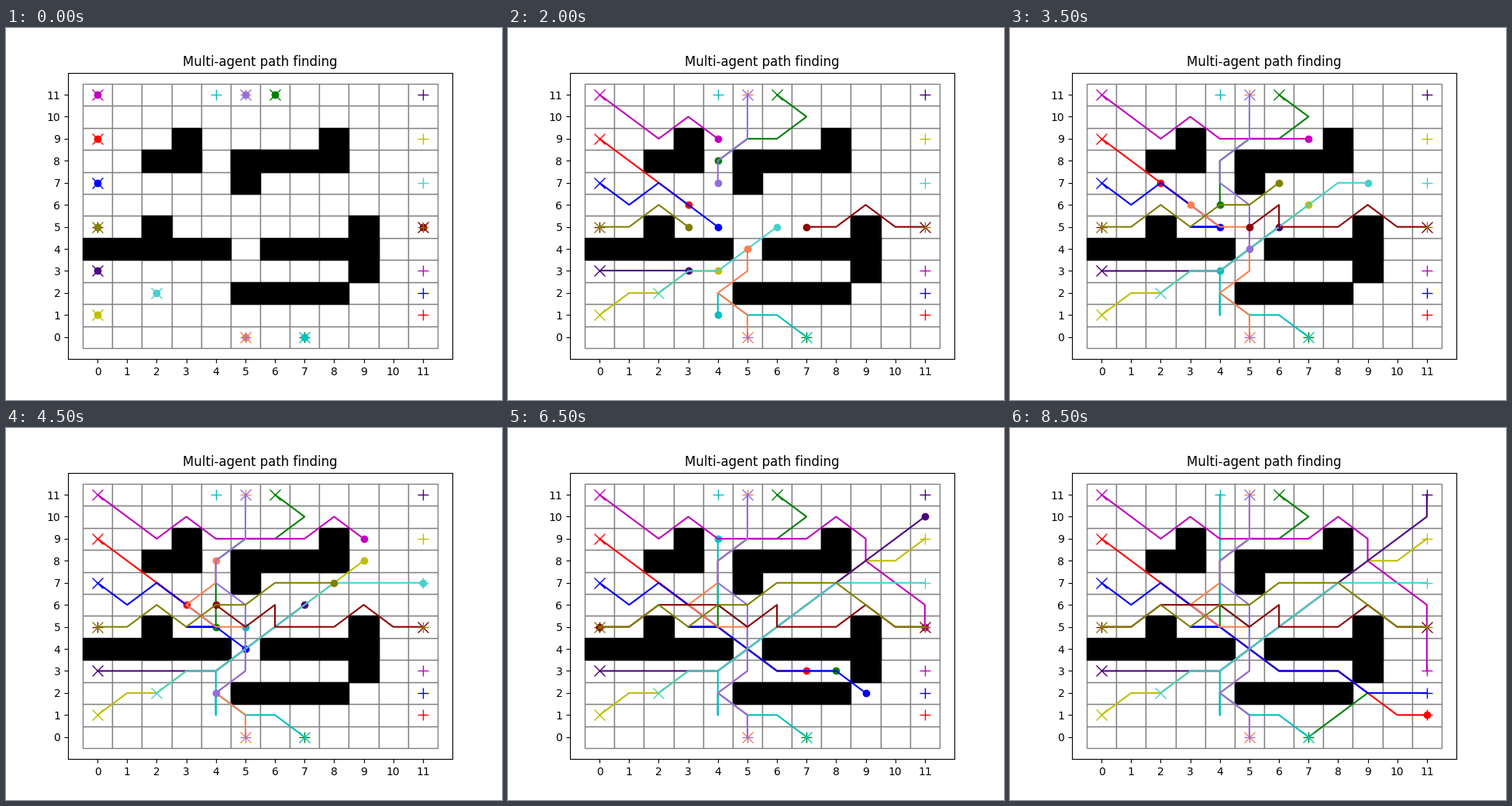
A matplotlib script for the animation above (10 s loop, 640 by 480 pixels).

```python
import matplotlib.pyplot as plt
import numpy as np
from matplotlib.animation import FuncAnimation
from matplotlib.patches import Rectangle

plt.rcParams["text.kerning_factor"] = 6

SIZE = 12
STEP_MS = 500
FRAMES = 20
WAIT = None

# Key cells per agent; between them it moves like a chess king.
EAST_LANE = [(8, 3), (9, 2)]
ROUTES = {
    "g": [(6, 11), (7, 10), (6, 9), (5, 9), (4, 6), WAIT, WAIT, (4, 5),
          *EAST_LANE, (7, 0)],
    "r": [(0, 9), (1, 8), WAIT, (3, 6), WAIT, WAIT, (2, 7), (3, 6), WAIT,
          *EAST_LANE, (11, 1)],
    "b": [(0, 7), (1, 6), (2, 7), (4, 5), WAIT, (3, 5), (4, 5), WAIT,
          *EAST_LANE, (11, 2)],
    "c": [(7, 0), (5, 1), (4, 2), (4, 1), (4, 3), WAIT, (5, 5), (4, 11)],
    "m": [(0, 11), (2, 9), (3, 10), (7, 9), (8, 10), (9, 9), (9, 8), (11, 3)],
    "y": [(0, 1), (2, 2), (4, 3), (10, 8), (11, 9)],
    "indigo": [(0, 3), (1, 3), WAIT, (4, 3), (7, 6), WAIT, (11, 11)],
    "mediumturquoise": [(2, 2), (4, 3), (11, 7)],
    "coral": [(5, 0), (5, 1), (4, 2), (5, 5), (4, 5), (3, 6), (4, 8), (5, 11)],
    "mediumpurple": [(5, 11), (5, 9), (4, 7), (5, 3), (4, 2), (5, 0)],
    "darkred": [(11, 5), (10, 5), (9, 6), (6, 5), (6, 6), (5, 5), WAIT,
                (2, 6), (0, 5)],
    "olive": [(0, 5), (1, 5), WAIT, (2, 6), (3, 5), (5, 6), (8, 7), (11, 5)],
}

# Straight walls from one cell to another.
WALLS = [((2, 8), (3, 8)), ((3, 8), (3, 9)), ((5, 8), (8, 8)),
         ((8, 8), (8, 9)), ((5, 7), (5, 8)), ((2, 4), (2, 5)),
         ((0, 4), (4, 4)), ((6, 4), (9, 4)), ((9, 3), (9, 5)),
         ((5, 2), (8, 2))]


def expand(keys):
    """One cell per time step: diagonal moves first, then straight ones."""
    cells = [np.array(keys[0])]
    for key in keys[1:]:
        if key is WAIT:
            cells.append(cells[-1])
            continue
        while tuple(cells[-1]) != key:
            cells.append(cells[-1] + np.sign(key - cells[-1]))
    return np.array(cells)


def add_block(ax, first, last, face, edge):
    (x0, y0), (x1, y1) = first, last
    ax.add_patch(Rectangle((x0 - 0.5, y0 - 0.5), x1 - x0 + 1, y1 - y0 + 1,
                           facecolor=face, edgecolor=edge))


def draw_grid(ax):
    for cell in np.ndindex(SIZE, SIZE):
        add_block(ax, cell, cell, "white", "gray")
    for first, last in WALLS:
        add_block(ax, first, last, "black", "black")


class Agent:
    def __init__(self, ax, color, keys):
        self.cells = expand(keys)
        self.trail, = ax.plot([], [], color=color)
        ax.plot(*self.cells[0], "x", color=color, markersize=10)
        ax.plot(*self.cells[-1], "+", color=color, markersize=10)
        self.dot, = ax.plot([], [], "o", color=color)

    def show(self, step):
        self.trail.set_data(*self.cells[:step + 1].T)
        # Empty once the agent has arrived.
        self.dot.set_data(*self.cells[step:step + 1].T)


fig, ax = plt.subplots(figsize=(6.4, 4.8), dpi=100)
ax.set_title("Multi-agent path finding")
draw_grid(ax)
agents = [Agent(ax, color, keys) for color, keys in ROUTES.items()]
ax.set(xlim=(-1, SIZE), ylim=(-1, SIZE), xticks=range(SIZE), yticks=range(SIZE))
last_step = max(len(agent.cells) for agent in agents) - 1


def update(frame):
    for agent in agents:
        agent.show(min(frame, last_step))
    return []


anim = FuncAnimation(fig, update, frames=FRAMES, interval=STEP_MS, repeat=True)
plt.show()
```
